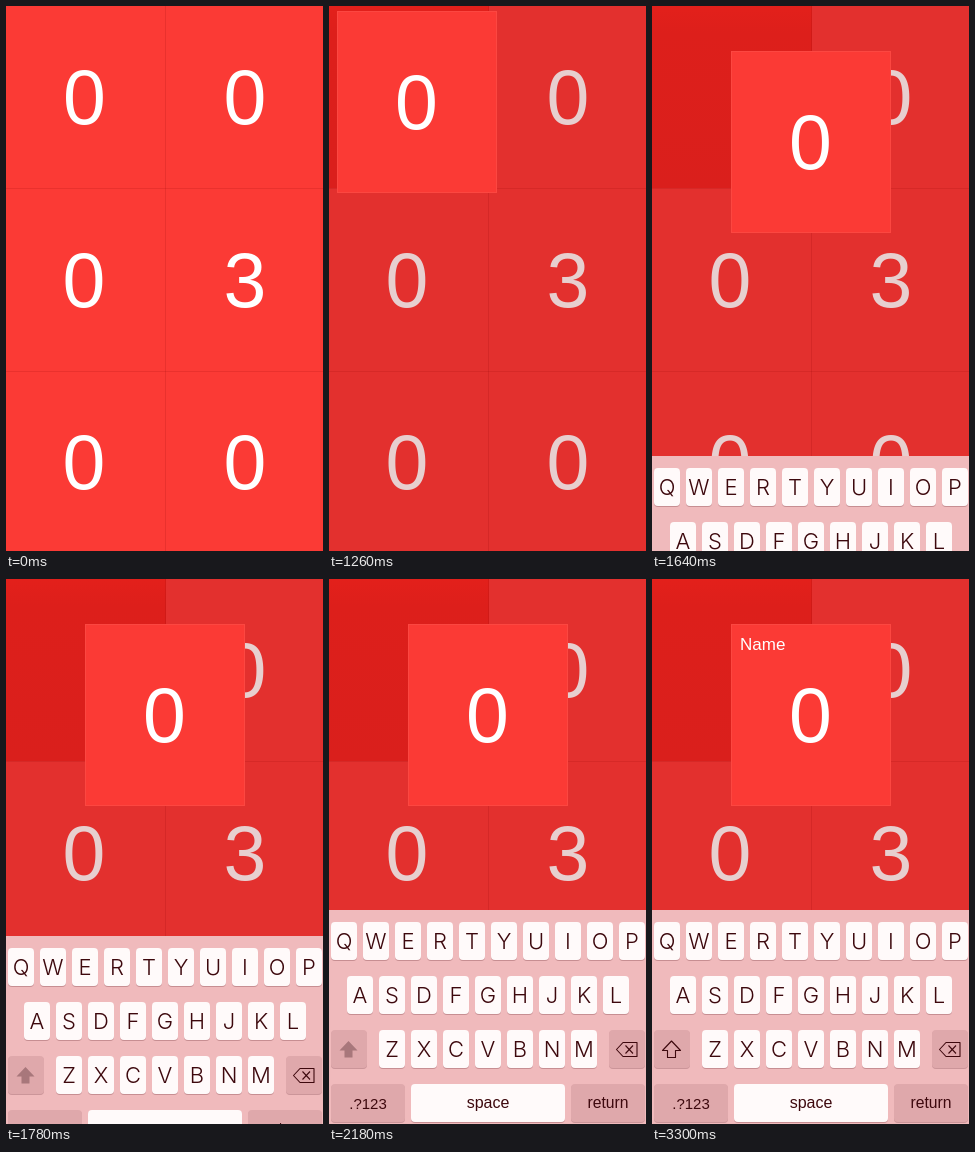
An HTML page with a canvas that plays this animation: 317 px wide and 545 px high, repeating every 3.32 s.

```html
<!DOCTYPE html>
<html lang="en">
<head>
<meta charset="utf-8">
<title>Counter tiles</title>
<style>
html, body { margin: 0; width: 100%; height: 100%; overflow: hidden; background: #fb3a35; }
canvas { display: block; width: 317px; height: 545px; }
</style>
</head>
<body>
<canvas id="stage"></canvas>
<script>
const W = 317, H = 545, LOOP = 3320;
const SANS = '"Liberation Sans", Arial, sans-serif';
const LIGHT = 'Inter, "Liberation Sans", sans-serif';
const INK = '#3d080d', SEAM = 'rgba(150,10,10,.17)';
const BRIGHT = [251, 58, 53], DIM = [227, 48, 46];
const WHITE = [255, 255, 255], FADED = [231, 207, 207];
const DIGITS = ['0', '0', '0', '3', '0', '0'];
const TYPED = [2720, 2900, 3080, 3280];

const canvas = document.getElementById('stage');
const ctx = canvas.getContext('2d');
const ratio = window.devicePixelRatio || 1;
canvas.width = Math.round(W * ratio);
canvas.height = Math.round(H * ratio);

const progress = (t, start, length) => Math.min(1, Math.max(0, (t - start) / length));
const ease = p => (1 - Math.cos(Math.PI * p)) / 2;
const mix = (a, b, p) => `rgb(${a.map((v, i) => Math.round(v + (b[i] - v) * p)).join(',')})`;

function rect(x, y, w, h, color) {
  ctx.fillStyle = color;
  ctx.fillRect(x, y, w, h);
}

function text(s, x, y, font, color, align = 'center') {
  ctx.font = font;
  ctx.fillStyle = color;
  ctx.textAlign = align;
  ctx.fillText(s, x, y);
}

function digit(s, x, y, color) {
  text(s, x, y, `77px ${SANS}`, color);
}

function path(points, close = true) {
  ctx.beginPath();
  points.forEach(([x, y]) => ctx.lineTo(x, y));
  if (close) ctx.closePath();
}

function drawGrid(t) {
  const shade = progress(t, 1180, 60);
  const ink = mix(WHITE, FADED, progress(t, 660, 520));
  rect(0, 0, W, H, mix(BRIGHT, DIM, shade));
  for (let i = 1; i < 6; i++) {
    digit(DIGITS[i], i % 2 ? 239 : 78, 118 + 182.6 * (i >> 1), ink);
  }
  const hole = ctx.createLinearGradient(0, 0, 0, 182);
  hole.addColorStop(0, '#e3201b');
  hole.addColorStop(.15, '#dd1f1b');
  hole.addColorStop(1, '#da1f1c');
  rect(0, 0, 160, 182, hole);
}

function drawSeams() {
  rect(159, 0, 1, H, SEAM);
  rect(0, 182, W, 1, SEAM);
  rect(0, 365, W, 1, SEAM);
}

function drawTile(t) {
  const p = ease(progress(t, 1180, 378));
  const x = Math.round(-1 + 80 * p), y = Math.round(45 * p);
  rect(x, y, 160, 182, mix(BRIGHT, BRIGHT, 0));
  if (p > 0) {
    ctx.strokeStyle = 'rgba(255,130,120,.18)';
    ctx.lineWidth = 1;
    ctx.strokeRect(x + .5, y + .5, 159, 181);
  } else {
    rect(159, 0, 1, 182, mix(BRIGHT, BRIGHT, 0));
    drawSeams();
  }
  digit('0', x + 79.5, y + 118, '#fff');
  const count = TYPED.filter(at => t >= at).length;
  text('Name'.slice(0, count), x + 9, y + 26, `17px ${SANS}`, '#fff', 'left');
}

function key(x, y, w, gray) {
  ctx.fillStyle = gray ? '#cb9599' : '#c78e92';
  ctx.beginPath();
  ctx.roundRect(x, y + 1, w, 38, 4);
  ctx.fill();
  ctx.fillStyle = gray ? '#dfa8ab' : '#fffafa';
  ctx.beginPath();
  ctx.roundRect(x, y, w, 38, 4);
  ctx.fill();
}

function letters(row, x, y) {
  [...row].forEach((c, i) => {
    key(x + 32 * i, y, 26);
    text(c, x + 32 * i + 13, y + 27, `300 22px ${LIGHT}`, INK);
  });
}

function drawShift(active) {
  path([[19.5, 131], [28.5, 140.5], [23.5, 140.5], [23.5, 147.5],
        [15.5, 147.5], [15.5, 140.5], [10.5, 140.5]]);
  if (active) {
    ctx.fillStyle = '#a8777b';
    ctx.fill();
  } else {
    ctx.stroke();
  }
}

function drawDelete() {
  path([[287.5, 139.5], [294, 132.5], [308, 132.5], [308, 146.5], [294, 146.5]]);
  ctx.stroke();
  path([[296.5, 135.5], [304, 143.5]], false);
  ctx.stroke();
  path([[304, 135.5], [296.5, 143.5]], false);
  ctx.stroke();
}

function drawKeyboard(t) {
  // Critically damped rise
  const s = Math.max(0, t - 1543) * .0154;
  const rise = 1 - (1 + s) * Math.exp(-s);
  const top = Math.round(H - 214 * rise);
  if (top >= H) return;
  ctx.save();
  ctx.translate(0, top);
  rect(0, 0, W, 216, '#f0babc');
  letters('QWERTYUIOP', 2, 12);
  letters('ASDFGHJKL', 18, 66);
  letters('ZXCVBNM', 50, 120);
  key(2, 120, 36, true);
  key(280, 120, 36, true);
  key(2, 174, 74, true);
  key(82, 174, 154);
  key(242, 174, 74, true);
  ctx.strokeStyle = INK;
  ctx.lineWidth = 1.1;
  ctx.lineJoin = 'round';
  drawShift(t < TYPED[0]);
  drawDelete();
  text('.?123', 39, 199, `15px ${SANS}`, INK);
  text('space', 159, 198, `16px ${SANS}`, INK);
  text('return', 279, 198, `15.7px ${SANS}`, INK);
  ctx.restore();
}

function frame() {
  const t = performance.now() % LOOP;
  ctx.setTransform(ratio, 0, 0, ratio, 0, 0);
  drawGrid(t);
  if (t > 1180) drawSeams();
  drawTile(t);
  drawKeyboard(t);
  requestAnimationFrame(frame);
}
frame();
</script>
</body>
</html>
```
